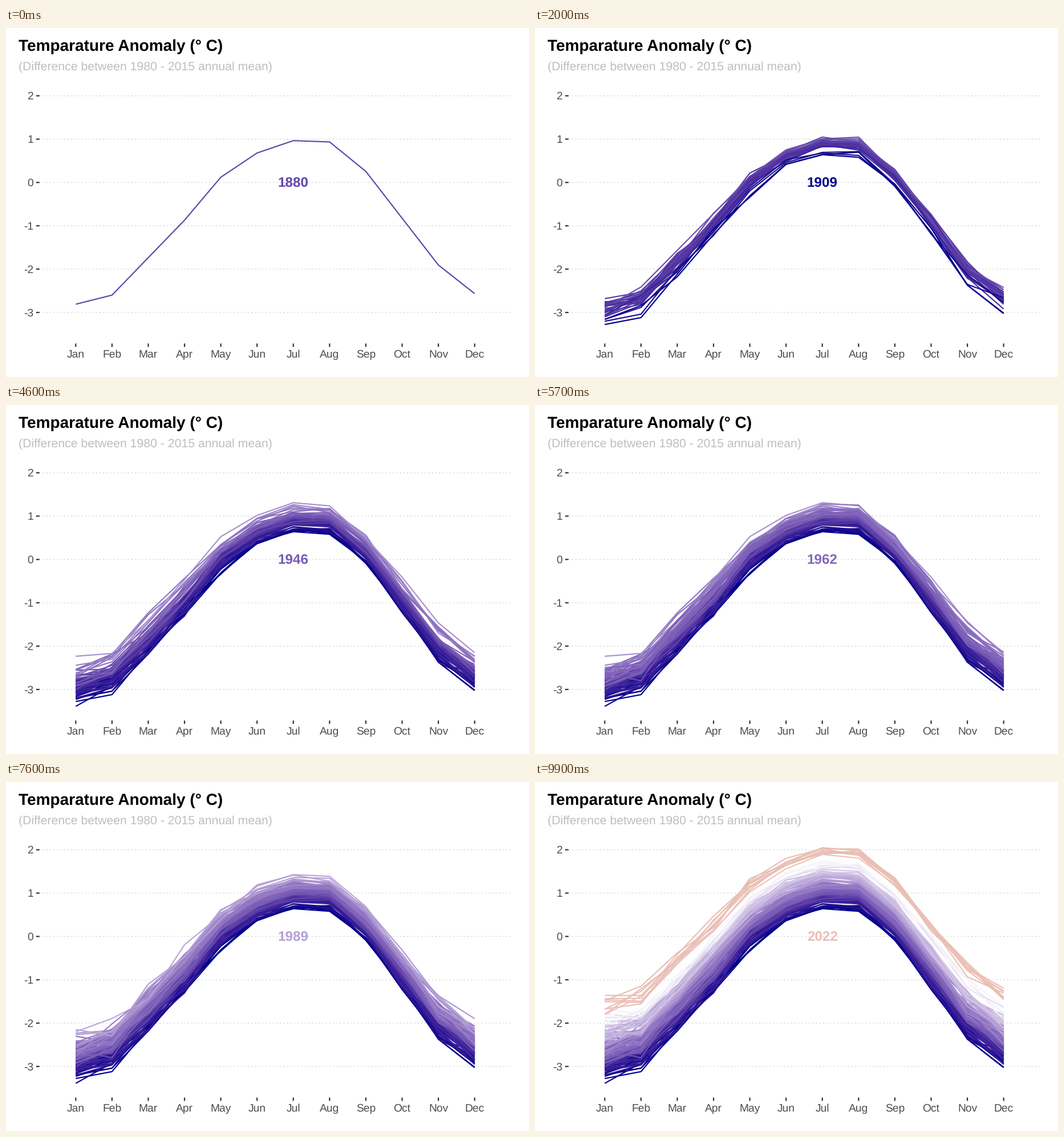
Recreate the animation shown at these times as a matplotlib script. Size 917 px wide and 611 px high, loop 10 s.

```python
import numpy as np
import matplotlib.pyplot as plt
from matplotlib.animation import FuncAnimation
from matplotlib.collections import LineCollection

W, H, DPI = 917, 611, 128
FRAMES, INTERVAL = 100, 100
FIRST, LAST = 1880, 2022
YEARS = np.arange(FIRST, LAST + 1)
MONTHS = "Jan Feb Mar Apr May Jun Jul Aug Sep Oct Nov Dec".split()

plt.rcParams["font.family"] = "Liberation Sans"
plt.rcParams["text.hinting"] = "none"

# Turning points of the yearly mean, joined by straight trends
TREND = {1880: -0.17, 1892: -0.28, 1900: -0.12, 1909: -0.49, 1918: -0.32,
         1929: -0.36, 1938: -0.04, 1944: 0.20, 1946: -0.07, 1962: 0.0,
         1978: 0.07, 1989: 0.27, 2000: 0.39, 2012: 0.65, 2016: 1.02,
         2022: 0.89}

# Seasonal curve of the first year
SEASON = np.array([-2.81, -2.60, -1.735, -0.87, 0.12, 0.68,
                   0.965, 0.935, 0.255, -0.825, -1.905, -2.565])


def annual_means(rng):
    knots = np.array(list(TREND))
    wobble = np.clip(rng.normal(0, 0.07, len(YEARS)), -0.14, 0.14)
    wobble[knots - FIRST] = 0
    mean = np.interp(YEARS, knots, list(TREND.values())) + wobble
    return np.clip(mean, -0.49, 1.02)


def monthly_values(rng, annual):
    """Season plus warming; winters shift and scatter more than summers."""
    winter = np.cos(2 * np.pi * (np.arange(12) - 0.5) / 12)
    scatter = rng.normal(0, 1, (len(YEARS), 12)).clip(-2.2, 2.2)
    scatter[0] = 0
    change = (annual - annual[0])[:, None]
    return (SEASON + change * (0.99 + 0.12 * winter)
            + scatter * (0.08 + 0.04 * winter))


def lab_to_rgb(lab):
    L, a, b = lab.T
    fy = (L + 16) / 116
    f = np.stack([fy + a / 500, fy, fy - b / 200])
    xyz = np.where(f > 6 / 29, f ** 3, 3 * (6 / 29) ** 2 * (f - 4 / 29))
    xyz *= np.array([[0.95047], [1], [1.08883]])
    lin = np.array([[3.2406, -1.5372, -0.4986],
                    [-0.9689, 1.8758, 0.0415],
                    [0.0557, -0.2040, 1.0570]]) @ xyz
    lin = np.clip(lin, 0, 1)
    rgb = np.where(lin <= 0.0031308, 12.92 * lin,
                   1.055 * lin ** (1 / 2.4) - 0.055)
    return np.clip(rgb, 0, 1).T


def year_colors(annual):
    """Dark blue through white to a muted red, blended in Lab."""
    white = np.array([100, 0, 0])
    cold = np.array([14.75, 50.42, -68.68])
    warm = np.array([28.1, 50.9, 41.3])
    d = (annual - 0.69)[:, None]
    below = np.clip(-d / 1.18, 0, 1)
    above = np.clip(d / 0.75, 0, 0.27)
    return lab_to_rgb(white + below * (cold - white) + above * (warm - white))


def pt(px):
    return px * 72 / DPI


def x_pos(month):
    return 122.3 + 63.58 * month


def y_pos(value):
    return 270.4 - 75.87 * value


fig = plt.figure(figsize=(W / DPI, H / DPI), dpi=DPI, facecolor="white")
ax = fig.add_axes([0, 0, 1, 1])
ax.set(xlim=(0, W), ylim=(H, 0))
ax.axis("off")


def label(x, y, s, size, color, **kw):
    return ax.text(x, y, s, fontsize=pt(size), color=color,
                   va="baseline", **kw)


def stroke(xs, ys, color, width, **kw):
    ax.plot(xs, ys, color=color, lw=pt(width), snap=False,
            solid_capstyle="butt", dash_capstyle="butt", **kw)


label(21.5, 40.4, "Temparature Anomaly (° C)", 28.05, "black", weight="bold")
label(21.5, 74, "(Difference between 1980 - 2015 annual mean)", 21.2, "#bebebe")

DOT = 1.2
for v in range(-3, 3):
    y = y_pos(v)
    stroke([58.7, 885.3], [y, y], "#bebebe", DOT,
           linestyle=(0, (1.5 / DOT, 4.7 / DOT)), zorder=1)
    stroke([52.8, 58.7], [y, y], "#333333", 2.2)
    label(48.2, y + 6.8, str(v), 19.2, "#4d4d4d", ha="right")

for m, name in enumerate(MONTHS):
    x = x_pos(m)
    stroke([x, x], [552.4, 558.3], "#333333", 2.2)
    label(x, 576.6, name, 19.2, "#4d4d4d", ha="center")

rng = np.random.default_rng(7)
annual = annual_means(rng)
colors = year_colors(annual)
xs = x_pos(np.arange(12))
paths = [np.column_stack([xs, y_pos(row)])
         for row in monthly_values(rng, annual)]

lines = LineCollection([], linewidths=pt(2.2), capstyle="butt",
                       joinstyle="round", zorder=3)
ax.add_collection(lines, autolim=False)
year_text = label(x_pos(6), 279, "", 24.3, "black", weight="bold",
                  ha="center", zorder=4)


def update(i):
    k = round(i * (LAST - FIRST) / (FRAMES - 1))
    lines.set_segments(paths[:k + 1])
    lines.set_color(colors[:k + 1])
    year_text.set_text(str(FIRST + k))
    year_text.set_color(colors[k])
    return lines, year_text


anim = FuncAnimation(fig, update, frames=FRAMES, interval=INTERVAL,
                     repeat=True, repeat_delay=0, blit=False)
plt.show()
```
